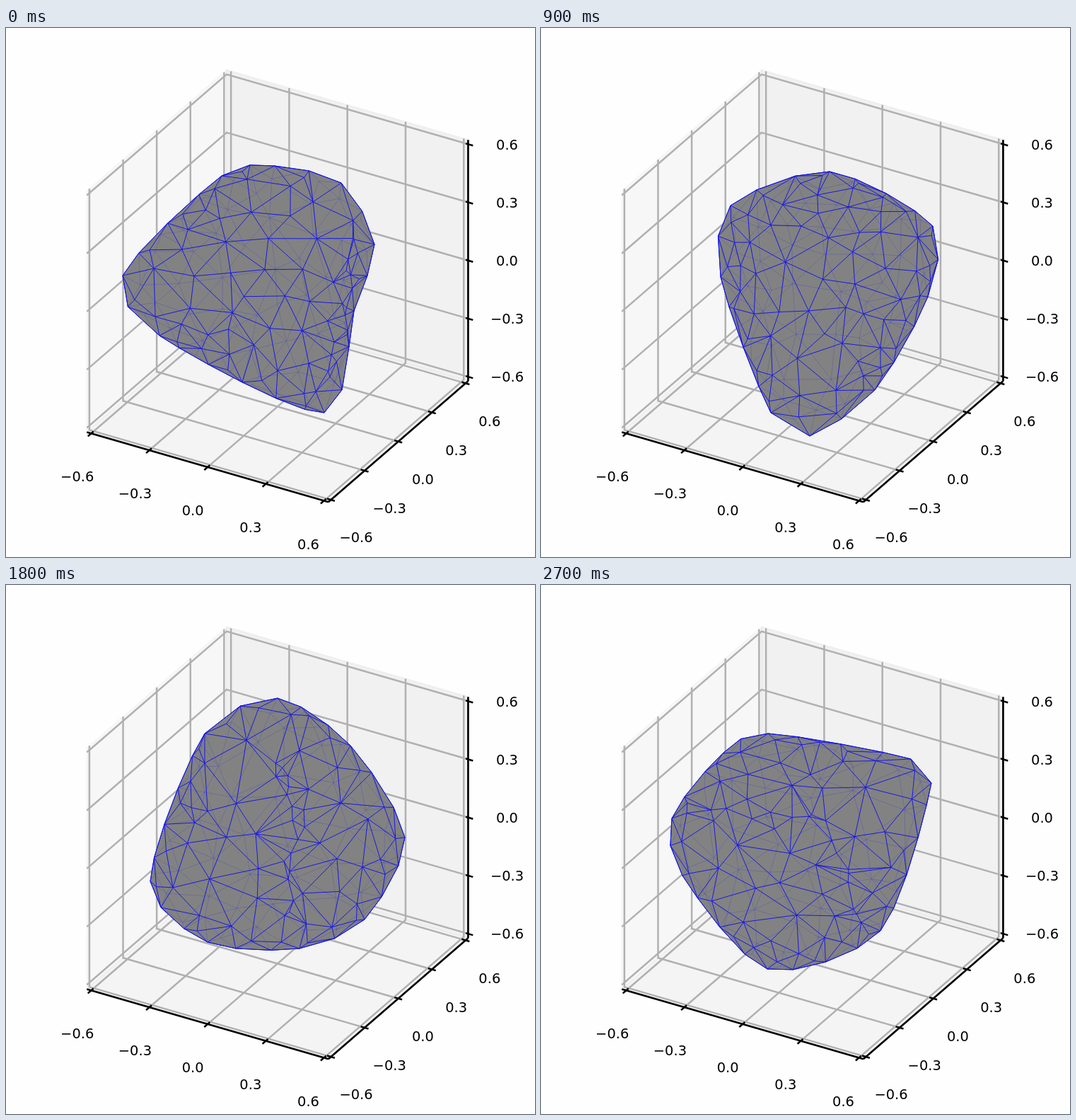
An HTML page with a canvas for the animation above (3000 ms loop, 748x748 px).

```html
<!DOCTYPE html>
<html>
<head>
<meta charset="utf-8">
<style>
  html, body { margin: 0; width: 100%; height: 100%; overflow: hidden; background: #fefefe; }
  canvas { display: block; }
</style>
</head>
<body>
<canvas id="stage" width="748" height="748"></canvas>
<script>
const ctx = document.getElementById('stage').getContext('2d');
const STEP = 300, LIM = 0.6225, TICKS = [-0.6, -0.3, 0, 0.3, 0.6];
const BLUE = '#1414ea', GRID = '#b0b0b0', BLACK = '#000';

// Orthographic projection of the plot cube.
const project = (x, y, z) => [
  383.9 + 274.3 * x + 158.7 * y,
  364.8 + 79.3 * x - 137.3 * y - 274 * z
];

function path(points) {
  ctx.beginPath();
  points.forEach(p => ctx.lineTo(...p));
}

function line(color, width, ...points) {
  path(points);
  ctx.strokeStyle = color;
  ctx.lineWidth = width;
  ctx.stroke();
}

function pane(shade, ...corners) {
  path(corners.map(c => project(...c)));
  ctx.closePath();
  ctx.fillStyle = ctx.strokeStyle = `rgba(${shade},${shade},${shade},.5)`;
  ctx.lineWidth = 2;
  ctx.fill();
  ctx.stroke();
}

function label(value, x, y) {
  ctx.fillText(value.toFixed(1).replace('-', '\u2212'), x, y + 7);
}

function drawAxes() {
  const L = LIM, P = project;
  pane(242, [-L, -L, -L], [-L, L, -L], [-L, L, L], [-L, -L, L]);
  pane(230, [-L, L, -L], [L, L, -L], [L, L, L], [-L, L, L]);
  pane(236, [-L, -L, -L], [L, -L, -L], [L, L, -L], [-L, L, -L]);
  for (const t of TICKS) {
    line(GRID, 2.5, P(t, -L, -L), P(t, L, -L), P(t, L, L));
    line(GRID, 2.5, P(L, t, -L), P(-L, t, -L), P(-L, t, L));
    line(GRID, 2.5, P(-L, -L, t), P(-L, L, t), P(L, L, t));
  }
  line(BLACK, 2.7, P(-L, -L, -L), P(L, -L, -L));
  line(BLACK, 2.7, P(L, -L, -L), P(L, L, -L));
  line(BLACK, 2.7, P(L, L, -L), P(L, L, L));
  ctx.font = '19.45px "DejaVu Sans", sans-serif';
  ctx.textAlign = 'center';
  ctx.fillStyle = BLACK;
  TICKS.forEach((t, i) => {
    line(BLACK, 2.5, P(t, -L - 0.03, -L), P(t, -L + 0.02, -L));
    line(BLACK, 2.5, P(L - 0.02, t, -L), P(L + 0.02, t, -L));
    line(BLACK, 2.5, P(L - 0.012, L, t), P(L + 0.025, L, t));
    label(t, 100.7 + 81.7 * i, 634 + 23.9 * i);
    label(t, 495 + 47.2 * i, 720 - 41.1 * i);
    label(t, 708.5, 493.3 - 82.2 * i);
  });
}

function random(seed) {
  return () => {
    seed = (seed * 1664525 + 1013904223) >>> 0;
    return seed / 4294967296;
  };
}

const sub = (a, b) => [a[0] - b[0], a[1] - b[1]];
const mix = (a, b, t) => [a[0] + (b[0] - a[0]) * t, a[1] + (b[1] - a[1]) * t];
const cross = (a, b) => a[0] * b[1] - a[1] * b[0];
const pairs = list => list.flatMap((v, i) => i % 2 ? [] : [[v, list[i + 1]]]);

// Closed spline through the key points, cut into edges of similar length.
function outlineOf(keys) {
  const at = i => keys[(i + keys.length) % keys.length];
  return keys.flatMap((a, i) => {
    const b = at(i + 1), u = sub(b, at(i - 1)), v = sub(at(i + 2), a);
    const n = Math.max(1, Math.round(Math.hypot(...sub(b, a)) / 46));
    return Array.from({ length: n }, (_, k) => {
      const t = k / n, p = mix(a, b, t * t * (3 - 2 * t));
      const cu = 0.4 * t * (1 - t) ** 2, cv = 0.4 * t * t * (t - 1);
      return [p[0] + cu * u[0] + cv * v[0], p[1] + cu * u[1] + cv * v[1]];
    });
  });
}

// Distance from the centre to the outline along unit direction u.
function reach(outline, u) {
  let far = 0;
  outline.forEach((a, i) => {
    const e = sub(outline[(i + 1) % outline.length], a);
    const s = -cross(a, u) / cross(e, u), t = cross(a, e) / cross(u, e);
    if (s > -1e-6 && s < 1 + 1e-6) far = Math.max(far, t);
  });
  return far;
}

// Evenly spread points on a hemisphere, seen from above as a unit disk.
function scatter(rim, count, rnd) {
  const pts = rim.map(p => [...p, 0]);
  const gap = p => Math.min(...pts.map(q => Math.hypot(p[0] - q[0], p[1] - q[1], p[2] - q[2])));
  for (let i = 0; i < count; i++) {
    let best, far = -1;
    for (let k = 0; k < 25; k++) {
      const z = 0.15 + 0.85 * rnd(), a = 2 * Math.PI * rnd(), r = Math.sqrt(1 - z * z);
      const p = [r * Math.cos(a), r * Math.sin(a), z], d = gap(p);
      if (d > far) { far = d; best = p; }
    }
    pts.push(best);
  }
  return pts.slice(rim.length);
}

function circle(a, b, c) {
  const [bx, by] = sub(b, a), [cx, cy] = sub(c, a);
  const d = 2 * (bx * cy - by * cx), bb = bx * bx + by * by, cc = cx * cx + cy * cy;
  const x = (cy * bb - by * cc) / d, y = (bx * cc - cx * bb) / d;
  return { x: a[0] + x, y: a[1] + y, r2: x * x + y * y };
}

// Edges of the Delaunay triangulation (Bowyer-Watson).
function delaunay(pts) {
  const n = pts.length, all = [...pts, [-2e4, -2e4], [2e4, -2e4], [0, 3e4]];
  const make = (...v) => ({ v, c: circle(...v.map(i => all[i])) });
  const sides = ([a, b, c]) => [[a, b], [b, c], [c, a]].map(e => e.sort((p, q) => p - q).join());
  let tris = [make(n, n + 1, n + 2)];
  for (let i = 0; i < n; i++) {
    const hole = new Set();
    tris = tris.filter(t => {
      if ((all[i][0] - t.c.x) ** 2 + (all[i][1] - t.c.y) ** 2 > t.c.r2) return true;
      for (const s of sides(t.v)) hole.delete(s) || hole.add(s);
      return false;
    });
    for (const s of hole) tris.push(make(...s.split(',').map(Number), i));
  }
  const edges = new Set(tris.flatMap(t => sides(t.v)));
  return [...edges].map(s => s.split(',').map(Number))
    .filter(e => e[1] < n).map(e => e.map(i => pts[i]));
}

// A stone with the given key points on its rim and an optional fold across its front.
function stone(keys, fold = []) {
  const outline = outlineOf(keys), rnd = random(keys[0][0] * 97);
  const mid = [0, 1].map(k => outline.reduce((sum, p) => sum + p[k], 0) / outline.length);
  const local = outline.map(p => sub(p, mid));
  const rim = local.map(([x, y]) => [x / Math.hypot(x, y), y / Math.hypot(x, y)]);
  const inside = p => {
    const [x, y] = sub(p, mid), r = Math.hypot(x, y);
    return r < 1 || r <= reach(local, [x / r, y / r]) + 0.5;
  };
  const jitter = p => p.map(v => v + 18 * (rnd() - 0.5));
  const ridge = fold.slice(1).flatMap((b, i) =>
    Array.from({ length: 7 }, (_, k) => jitter(mix(fold[i], b, (k + 0.5) / 7))));
  const mesh = (count, extra) => {
    const inner = scatter(rim, count, rnd).map(([x, y]) => {
      const r = Math.hypot(x, y), d = reach(local, [x / r, y / r]);
      return [mid[0] + x * d, mid[1] + y * d];
    });
    return delaunay([...outline, ...inner, ...extra.filter(inside)])
      .filter(([a, b]) => inside(mix(a, b, 0.5)));
  };
  return { outline, back: mesh(55, []), front: mesh(fold.length ? 52 : 64, ridge) };
}

const shape = (rim, fold = []) => stone(pairs(rim), pairs(fold));

function oval(left, top, right, bottom) {
  return stone(Array.from({ length: 8 }, (_, i) => {
    const a = i * Math.PI / 4;
    return [(left + right + (right - left) * Math.cos(a)) / 2,
            (top + bottom + (bottom - top) * Math.sin(a)) / 2];
  }));
}

const shapes = [
  shape([165, 350, 305, 209, 380, 195, 474, 219, 521, 306, 492, 400, 450, 544, 217, 435],
    [492, 280, 485, 400, 440, 520]),
  shape([400, 192, 520, 269, 570, 390, 540, 490, 383, 513, 279, 478, 224, 349, 262, 247]),
  oval(181, 205, 545, 519),
  shape([408, 203, 554, 280, 547, 380, 472, 512, 380, 577, 325, 544, 254, 352, 268, 251]),
  shape([410, 188, 470, 212, 547, 413, 460, 517, 290, 474, 204, 467, 188, 410, 300, 262]),
  oval(204, 190, 546, 511),
  shape([384, 160, 487, 227, 564, 357, 507, 473, 415, 514, 285, 505, 204, 419, 281, 210],
    [375, 240, 420, 330, 395, 470]),
  shape([311, 202, 575, 250, 603, 292, 495, 496, 395, 542, 267, 457, 236, 370, 258, 243],
    [260, 260, 330, 350, 320, 470]),
  oval(204, 212, 550, 543),
  shape([321, 210, 523, 246, 552, 280, 480, 489, 320, 543, 200, 411, 185, 330, 257, 238],
    [195, 322, 400, 325, 455, 485])
];

function strokeEdges(edges, color, width) {
  ctx.beginPath();
  for (const [a, b] of edges) {
    ctx.moveTo(...a);
    ctx.lineTo(...b);
  }
  ctx.strokeStyle = color;
  ctx.lineWidth = width;
  ctx.stroke();
}

function drawShape({ outline, back, front }) {
  path(outline);
  ctx.fillStyle = '#828282';
  ctx.fill();
  strokeEdges(back, 'rgba(60,60,200,.36)', 0.8);
  strokeEdges(front, BLUE, 0.95);
  line(BLUE, 0.95, ...outline, outline[0]);
}

let shown = -1, start;
function draw(now) {
  start ??= now;
  const index = Math.floor((now - start) / STEP) % shapes.length;
  if (index !== shown) {
    shown = index;
    ctx.fillStyle = '#fefefe';
    ctx.fillRect(0, 0, 748, 748);
    drawAxes();
    drawShape(shapes[index]);
  }
  requestAnimationFrame(draw);
}
requestAnimationFrame(draw);
</script>
</body>
</html>
```
